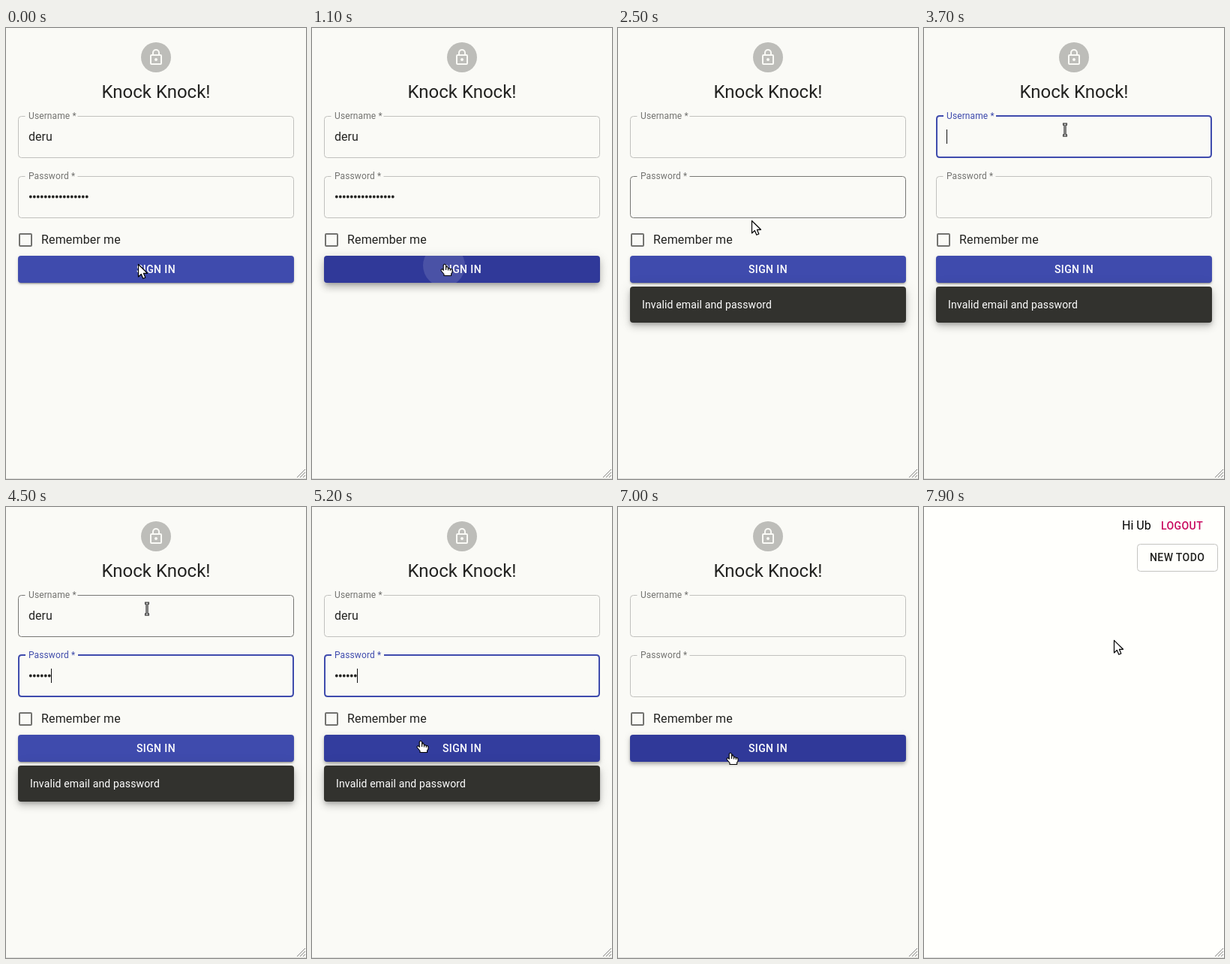
An HTML page for the animation above (8 s loop, 400 px wide and 600 px high).

```html
<!DOCTYPE html>
<html lang="en">
<head>
<meta charset="utf-8">
<title>Sign in</title>
<style>
html, body { margin: 0; width: 100%; height: 100%; overflow: hidden; }
body { position: relative; font-family: Roboto, sans-serif; }
svg, #button, #snack { position: absolute; }
svg { left: 0; top: 0; }
text { white-space: pre; }
#button, #snack { left: 16px; width: 368px; border-radius: 4px; color: #fff; }
#button { top: 303px; height: 36px; overflow: hidden; font: 500 14px/36px Roboto, sans-serif; letter-spacing: .4px; text-align: center; }
#ripple { position: absolute; border-radius: 50%; background: #fff; }
#snack { top: 344px; height: 48px; box-sizing: border-box; padding-left: 16px; background: #32322e; font: 14px/48px Roboto, sans-serif; letter-spacing: .15px; }
.label { font-size: 12px; letter-spacing: .11px; }
.input { font-size: 16px; letter-spacing: 0; fill: #252523; }
.action { font-size: 14px; font-weight: 500; letter-spacing: .4px; }
</style>
</head>
<body>
<div id="login">
  <svg width="400" height="600">
    <circle cx="200" cy="39" r="20" fill="#bdbdb9"/>
    <g fill="none" stroke="#fafaf6" stroke-width="2">
      <rect x="193" y="36" width="14" height="12" rx="1"/>
      <path d="M196 36v-3a4 4 0 0 1 8 0v3"/>
    </g>
    <circle cx="200" cy="42" r="2" fill="#fafaf6"/>
    <text x="200" y="93" font-size="24" text-anchor="middle" fill="#222220">Knock Knock!</text>
    <path id="userBox" fill="none"/>
    <text id="userLabel" class="label" x="30" y="121">Username *</text>
    <text id="userText" class="input" x="30" y="150"></text>
    <path id="passBox" fill="none"/>
    <text id="passLabel" class="label" x="30" y="201">Password *</text>
    <path id="dots" fill="none" stroke="#252523" stroke-width="3.8" stroke-linecap="round" stroke-dasharray="0 5"/>
    <rect id="caret" width="1" height="19" fill="#111"/>
    <rect x="18" y="274" width="16" height="16" rx="1" fill="none" stroke="#737370" stroke-width="2"/>
    <text x="47" y="287" font-size="16" letter-spacing=".15" fill="#222220">Remember me</text>
  </svg>
  <div id="button"><div id="ripple"></div><span style="position:relative">SIGN IN</span></div>
  <div id="snack">Invalid email and password</div>
</div>
<div id="home">
  <svg width="400" height="600">
    <text x="264" y="30" font-size="16">Hi Ub</text>
    <text class="action" x="316" y="30" fill="#c8085f">LOGOUT</text>
    <rect x="284.5" y="49.5" width="107" height="36" rx="4" fill="none" stroke="#c4c4c1"/>
    <text class="action" x="301" y="72" fill="#222220">NEW TODO</text>
  </svg>
</div>
<svg width="400" height="600">
  <path d="M0 599.5H400" stroke="#dededb"/>
  <path d="M388 598l11-11M392 598l7-7M396 598l3-3" stroke="#888885"/>
  <g id="cursor" stroke-linejoin="round">
    <path id="arrow" d="M.5.5V17L4.3 13.5 6.8 19.3 9.8 18 7.4 12.3H12.5Z" fill="#fff" stroke="#000" stroke-width="1.2"/>
    <g id="hand" stroke="#000" stroke-width="1.1">
      <path d="M-1.8 1.5Q0-1 1.6 1.5V5.5Q3-.0 4.5 6Q6 5 7.3 6.6Q9.5 6 10 8.5V11L8.6 13V15.5H-1V13.5L-4.8 9Q-5.4 6.5-3 7L-1.8 8.5Z" fill="#fff"/>
      <path d="M1.6 5.5V8M4.5 6V8.5M7.3 6.6V9" fill="none"/>
    </g>
    <g id="beam" fill="none">
      <path d="M-3-7.5H3M0-7.5V7.5M-3 7.5H3" stroke="#000" stroke-width="3"/>
      <path d="M-2.5-7.5H2.5M0-7.5V7.5M-2.5 7.5H2.5" stroke="#fff"/>
    </g>
  </g>
</svg>
<script>
const LOOP = 8000, FRAME = 100;
const USER = 'deru';
const el = Object.fromEntries([...document.querySelectorAll('[id]')].map(e => [e.id, e]));

// time, pointer shape, x, y
const pointer = [
  [0, 'arrow', 176, 314], [100, 'hand', 177, 314],
  [2400, 'arrow', 178, 290], [2500, 'arrow', 178, 256], [2600, 'beam', 179, 236], [2700, 'beam', 180, 212],
  [2800, 'arrow', 180, 184], [2900, 'beam', 181, 174],
  [3100, 'beam', 184, 158], [3200, 'beam', 194, 140], [3300, 'beam', 188, 135.5], [4900, 'beam', 181, 150],
  [5200, 'hand', 145, 311], [5300, 'hand', 148, 320], [5400, 'hand', 150, 326], [5500, 'hand', 150, 327],
  [7300, 'arrow', 150, 327], [7700, 'arrow', 189, 258], [7900, 'arrow', 253, 177]
];
const presses = [{ start: 990, x: 176, y: 316 }, { start: 5900, x: 150, y: 327 }];
const HOLD = 250;

// offset y, blur, spread for each of the three shadow layers
const REST = [[3, 1, -2], [2, 2, 0], [1, 5, 0]];
const HOVER = [[2, 4, -1], [4, 5, 0], [1, 10, 0]];
const PRESSED = [[5, 5, -3], [8, 10, 1], [3, 14, 2]];
const SNACK = [[3, 5, -1], [6, 10, 0], [1, 18, 0]];

const mix = (a, b, k) => a + (b - a) * k;
const mixList = (a, b, k) => a.map((v, i) => Array.isArray(v) ? mixList(v, b[i], k) : mix(v, b[i], k));
const rgb = c => `rgb(${c.map(Math.round)})`;
const shadow = layers => layers.map(([y, blur, spread], i) =>
  `0 ${y}px ${blur}px ${spread}px rgba(0,0,0,${[.2, .14, .12][i]})`).join();
const within = (t, a, b) => t >= a && t < b;

// cubic-bezier(.4, 0, .2, 1)
function ease(x) {
  if (x <= 0) return 0;
  if (x >= 1) return 1;
  let lo = 0, hi = 1, s;
  for (let i = 0; i < 20; i++) {
    s = (lo + hi) / 2;
    if (1.2 * s * (1 - s) ** 2 + .6 * s * s * (1 - s) + s ** 3 < x) lo = s; else hi = s;
  }
  return 3 * s * s * (1 - s) + s ** 3;
}
const ramp = (t, start, duration) => ease((t - start) / duration);

function drawField(name, top, hovered, focused, labelMix) {
  const d = focused ? 1 : .5, y = focused ? top : top + .5;
  const left = 16 + d, right = 384 - d, bottom = top + 56 - d;
  const box = el[name + 'Box'];
  box.setAttribute('d', `M${95 + d} ${y}H${right - 4}q4 0 4 4V${bottom - 4}q0 4-4 4H${left + 4}q-4 0-4-4V${y + 4}q0-4 4-4H${25 + d}`);
  box.setAttribute('stroke', focused ? '#3f4bad' : hovered ? '#777774' : '#c1c1be');
  box.setAttribute('stroke-width', 2 * d);
  el[name + 'Label'].setAttribute('fill', rgb(mixList([115, 115, 112], [63, 75, 173], labelMix)));
}

function drawButton(t) {
  const hover = ramp(t, 50, 200) - ramp(t, 2310, 200) + ramp(t, 5101, 200);
  const press = presses.findLast(p => t >= p.start);
  let down = 0;
  el.ripple.style.opacity = 0;
  if (press) {
    const age = t - press.start;
    const grow = ramp(age, 0, 550);
    const x = press.x - 16, y = press.y - 303;
    const r = grow * Math.hypot(Math.max(x, 368 - x), Math.max(y, 36 - y));
    Object.assign(el.ripple.style, {
      left: x - r + 'px', top: y - r + 'px', width: 2 * r + 'px', height: 2 * r + 'px',
      opacity: mix(.1, .3, grow) * (1 - ramp(age, HOLD, 550))
    });
    down = ramp(age, 0, 250) - ramp(age, HOLD, 250);
  }
  el.button.style.background = rgb(mixList([63, 75, 173], [48, 57, 153], hover));
  el.button.style.boxShadow = shadow(mixList(mixList(REST, HOVER, hover), PRESSED, down));
}

function drawPointer(t) {
  const [, shape, x, y] = pointer.findLast(p => t >= p[0]);
  for (const id of ['arrow', 'hand', 'beam']) el[id].style.display = id === shape ? '' : 'none';
  el.cursor.setAttribute('transform', `translate(${x} ${y})`);
}

function drawForm(t) {
  const userFocus = within(t, 3500, 4400), passFocus = within(t, 4400, 6000);
  drawField('user', 117, within(t, 2900, 5200), userFocus, userFocus ? ramp(t, 3450, 200) : 0);
  drawField('pass', 197, within(t, 2500, 2800), passFocus, passFocus ? ramp(t, 4350, 200) : 0);

  const filled = t < 1300 || within(t, 4300, 6200);
  el.userText.textContent = filled ? USER : within(t, 4200, 4300) ? USER.slice(0, 2) : '';
  const count = t < 1300 ? 16 : within(t, 4500, 6200) ? 6 : within(t, 4400, 4500) ? 2 : 0;
  el.dots.setAttribute('d', count ? `M32.8 224.5h${count * 5 - 4.9}` : '');

  el.caret.style.display = userFocus || passFocus ? '' : 'none';
  el.caret.setAttribute('x', 30 + Math.round(userFocus ? el.userText.getComputedTextLength() : count * 5));
  el.caret.setAttribute('y', userFocus ? 135 : 215);
  el.snack.style.display = within(t, 2200, 6200) ? '' : 'none';
}

function draw(now) {
  const t = Math.floor(now % LOOP / FRAME) * FRAME;
  const signedIn = t >= 7200;
  document.body.style.background = signedIn ? '#fffffc' : '#fafaf6';
  el.login.style.display = signedIn ? 'none' : '';
  el.home.style.display = signedIn ? '' : 'none';
  if (!signedIn) {
    drawForm(t);
    drawButton(t);
  }
  drawPointer(t);
}

el.snack.style.boxShadow = shadow(SNACK);
const begin = performance.now();
function tick() {
  draw(performance.now() - begin);
  requestAnimationFrame(tick);
}
tick();
</script>
</body>
</html>
```
